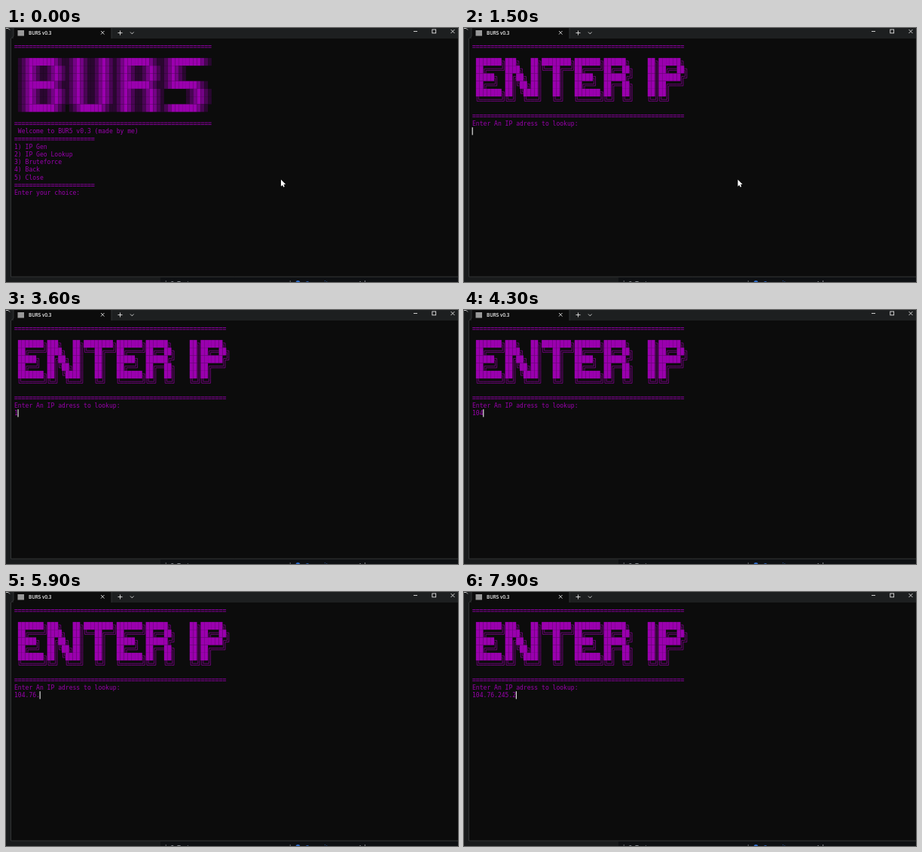
Recreate the animation shown at these times as an HTML page with a canvas. Size 600 by 338 pixels, loop 8000 ms.

```html
<!DOCTYPE html>
<html lang="en">
<head>
<meta charset="utf-8">
<title>BUR5 v0.3</title>
<style>
  html, body { margin: 0; width: 100%; height: 100%; overflow: hidden; background: #0c0c0c; }
  canvas { display: block; }
</style>
</head>
<body>
<canvas id="stage" width="600" height="338"></canvas>
<script>
const ctx = document.getElementById('stage').getContext('2d');
const LEFT = 11, TOP = 19.4, CW = 4.85, RH = 10.25;
const PURPLE = '#9a00ae', TYPED = '104.76.245.2';
const SHADES = { '░': '#2a0730', '▒': '#4a0555', '▓': '#740385', '█': PURPLE };
const CORNERS = { '╔': [1, 1], '╗': [-1, 1], '╚': [1, -1], '╝': [-1, -1] };

// Row types of the shaded banner font
const ROWS = {
  L: '░▒▓█▓▒░░▒▓█▓▒░',
  T: '░▒▓███████▓▒░',
  C: ' ░▒▓██████▓▒░',
  F: '░▒▓████████▓▒░',
  l: '░▒▓█▓▒░',
  r: '       ░▒▓█▓▒░'
};
const TITLE = ['TLLTLLT', 'LLLLLLC', 'TLLTLLL', 'FllTrrT'];

const ENTER_IP = [
  '███████╗███╗   ██╗████████╗███████╗██████╗     ██╗██████╗',
  '██╔════╝████╗  ██║╚══██╔══╝██╔════╝██╔══██╗    ██║██╔══██╗',
  '█████╗  ██╔██╗ ██║   ██║   █████╗  ██████╔╝    ██║██████╔╝',
  '██╔══╝  ██║╚██╗██║   ██║   ██╔══╝  ██╔══██╗    ██║██╔═══╝',
  '███████╗██║ ╚████║   ██║   ███████╗██║  ██║    ██║██║',
  '╚══════╝╚═╝  ╚═══╝   ╚═╝   ╚══════╝╚═╝  ╚═╝    ╚═╝╚═╝'
];
const MENU = ['1) IP Gen', '2) IP Geo Lookup', '3) Bruteforce', '4) Back', '5) Close'];

// [time, typed characters, caret visible]
const STEPS = [
  [0, 0, 0], [100, 0, 1], [600, 0, 0], [1100, 0, 1], [1300, 1, 1],
  [1500, 0, 1], [1700, 0, 0], [2200, 0, 1], [2700, 0, 0], [3200, 0, 1],
  [3500, 1, 1], [3800, 1, 0], [3900, 2, 1], [4200, 2, 0], [4300, 3, 1],
  [4700, 3, 0], [4800, 4, 1], [5000, 5, 1], [5500, 6, 1], [5900, 7, 1],
  [6400, 7, 0], [6500, 8, 1], [6700, 8, 0], [6800, 9, 1], [7200, 9, 0],
  [7300, 10, 1], [7500, 11, 1], [7900, 12, 1]
];

const colX = c => LEFT + c * CW;
const rowY = r => TOP + r * RH;

function rect(color, x, y, w, h) {
  ctx.fillStyle = color;
  ctx.fillRect(x, y, w, h);
}

function path(color, width, ...lines) {
  ctx.strokeStyle = color;
  ctx.lineWidth = width;
  ctx.beginPath();
  for (const pts of lines)
    pts.forEach(([x, y], i) => i ? ctx.lineTo(x, y) : ctx.moveTo(x, y));
  ctx.stroke();
}

function label(text, x, y, font, color) {
  ctx.font = font;
  ctx.fillStyle = color;
  ctx.fillText(text, x, y);
}

function print(text, row) {
  label(text, LEFT, rowY(row) + 8, '8.056px "DejaVu Sans Mono", monospace', PURPLE);
}

function rule(count, row) {
  for (let c = 0; c < count; c++)
    for (const dy of [3.6, 6]) rect('#85009a', colX(c) + 0.2, rowY(row) + dy, CW - 0.4, 1);
}

function glyph(ch, col, row) {
  const x = colX(col), y = rowY(row);
  if (SHADES[ch]) return rect(SHADES[ch], x, y, CW, RH);
  const cx = x + CW / 2, cy = y + RH / 2, g = 1.1, color = '#80008f';
  if (ch === '═')
    path(color, 0.8, [[x, cy - g], [x + CW, cy - g]], [[x, cy + g], [x + CW, cy + g]]);
  else if (ch === '║')
    path(color, 0.8, [[cx - g, y], [cx - g, y + RH]], [[cx + g, y], [cx + g, y + RH]]);
  else if (CORNERS[ch]) {
    const [h, v] = CORNERS[ch];
    path(color, 0.8, ...[-g, g].map(d => [
      [cx + h * CW / 2, cy + v * d], [cx + h * d, cy + v * d], [cx + h * d, cy + v * RH / 2]
    ]));
  }
}

function art(text, col, row) {
  [...text].forEach((ch, i) => glyph(ch, col + i, row));
}

function chrome() {
  rect('#191b1c', 0, 0, 600, 338);
  rect('#1d1f20', 7, 0, 593, 15);
  rect('#0c0c0c', 7, 14, 593, 317);
  rect('#0c0c0c', 10, 0, 130, 15);
  path('#393b3c', 0.8, [[10, 0], [10, 11], [6.5, 14], [6.5, 331], [600, 331]]);
  path('#393b3c', 0.8, [[140, 0], [140, 14]]);
  rect('#0e1013', 205, 332, 395, 6);

  rect('#9a9a9a', 15.5, 3, 8.5, 7.5);
  label('BUR5 v0.3', 30, 9, '600 6.3px "Open Sans", sans-serif', '#f2f2f2');
  const ink = '#e0e0e0';
  path(ink, 0.9, [[126, 4], [130.5, 8.5]], [[130.5, 4], [126, 8.5]]);
  path(ink, 0.9, [[148.5, 6.5], [154.5, 6.5]], [[151.5, 3.5], [151.5, 9.5]]);
  path(ink, 0.9, [[165, 5.5], [167.3, 7.8], [169.6, 5.5]]);
  path(ink, 0.9, [[541, 4.5], [546, 4.5]]);
  path(ink, 0.9, [[590.5, 2], [595.5, 7]], [[595.5, 2], [590.5, 7]]);
  ctx.strokeRect(565.8, 2, 4.8, 4.8);
  path('#c8c8c8', 1, [[0, 0.5], [3, 0.5], [5, 2.5]]);

  // Tops of the line hidden below the stage
  const small = '600 8px "Open Sans", sans-serif';
  label('|  8  Text', 210, 342.5, small, '#8b8f94');
  label('|', 375, 342.5, small, '#8b8f94');
  label('Commits', 397, 342.5, small, '#2c62b8');
  label('or  Ad', 455, 342.5, small, '#8b8f94');
  ctx.fillStyle = '#2f6fd0';
  ctx.beginPath();
  ctx.arc(387.5, 339, 3, 0, Math.PI * 2);
  ctx.fill();
}

function menuScreen(typed) {
  rule(54, 0);
  TITLE.forEach((letter, i) =>
    [...letter].forEach((type, r) => art(ROWS[type], 1 + 13 * i, 2 + r)));
  rule(54, 10);
  print(' Welcome to BUR5 v0.3 (made by me)', 11);
  rule(22, 12);
  MENU.forEach((item, i) => print(item, 13 + i));
  rule(22, 18);
  print('Enter your choice: ' + (typed ? '2' : ''), 19);
}

function lookupScreen(typed) {
  rule(58, 0);
  ENTER_IP.forEach((line, i) => art(line, 1, 2 + i));
  rule(58, 9);
  print('Enter An IP adress to lookup:', 10);
  print(TYPED.slice(0, typed), 11);
}

function pointer(x, y) {
  ctx.fillStyle = '#fff';
  ctx.beginPath();
  for (const [dx, dy] of [[0, 0], [0, 9], [2, 7.2], [3.4, 10], [4.8, 9.4], [3.5, 6.6], [6.2, 6.4]])
    ctx.lineTo(x + dx, y + dy);
  ctx.fill();
}

function draw(t) {
  const [, typed, caret] = STEPS.findLast(s => s[0] <= t);
  const menu = t < 1500;
  chrome();
  (menu ? menuScreen : lookupScreen)(typed);
  if (caret) rect('#dcdcdc', colX(typed + (menu ? 19 : 0)) - 0.4, rowY(menu ? 19 : 11), 1.2, RH);
  // The pointer hides while keys are pressed
  if (t < 1300 || (t >= 1500 && t < 3500)) pointer(t < 1000 ? 365 : 363.5, 201.7);
}

function tick(now) {
  draw(now % 8000);
  requestAnimationFrame(tick);
}
draw(0);
requestAnimationFrame(tick);
</script>
</body>
</html>
```
